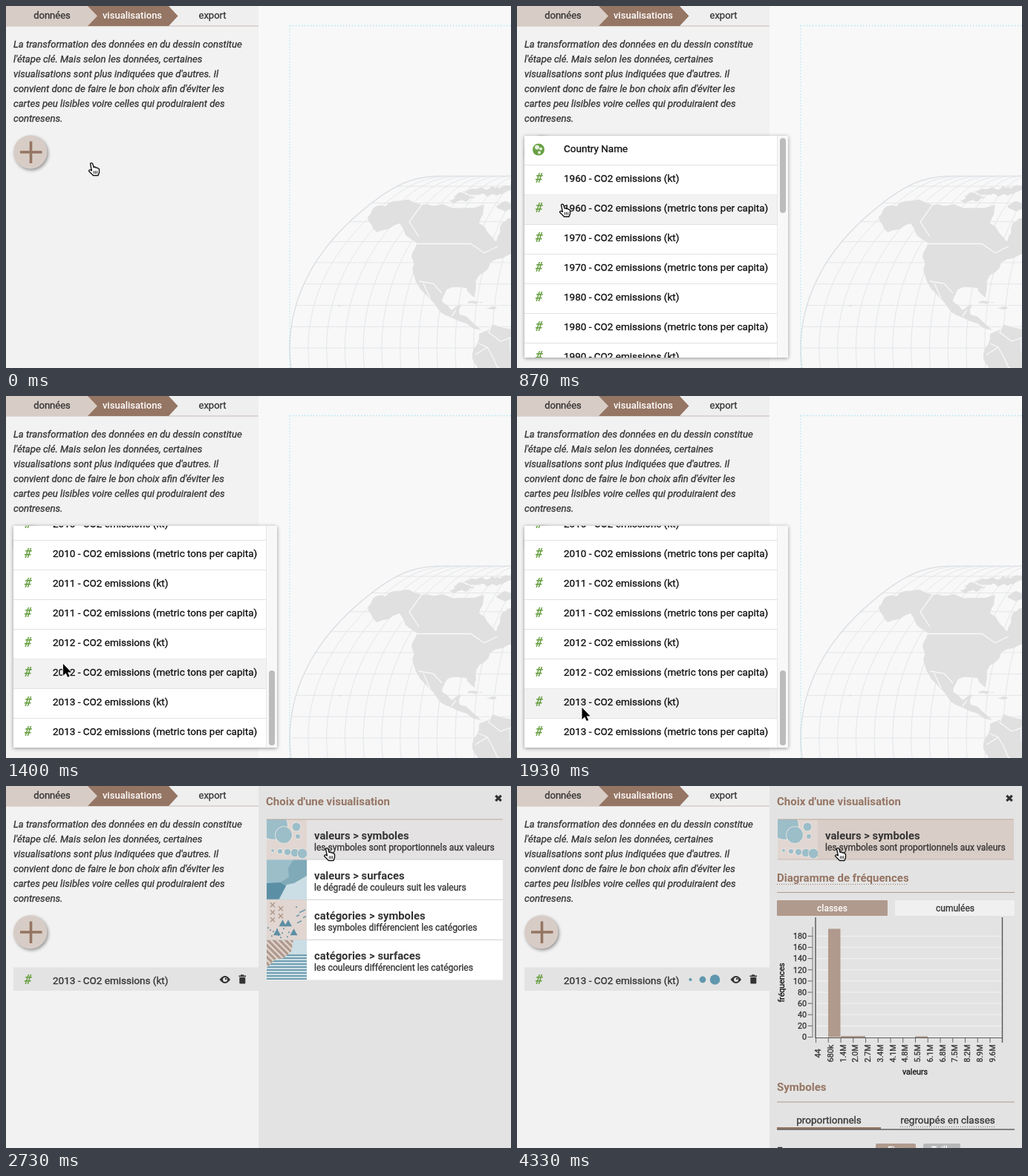
Recreate the animation shown at these times as an HTML page with a canvas. Size 680 by 488 pixels, loop 4.39 s.

```html
<!DOCTYPE html>
<html lang="fr">
<head>
<meta charset="utf-8">
<title>Visualisations</title>
<style>
html, body { margin: 0; width: 100%; height: 100%; overflow: hidden; background: #f8f8f8; }
canvas { display: block; }
</style>
</head>
<body>
<canvas id="stage" width="680" height="488"></canvas>
<script>
const W = 680, H = 488, LOOP = 4390;
const BROWN = '#957563', SAND = '#d8cdc6', TAUPE = '#b09a8d', INK = '#333', GREY = '#e3e3e3';
const GREEN = '#68a043', BLUE = '#9bbec9', STEEL = '#5b8fa5', PALE = '#cbdee5', ROSE = '#e1d6d1';
const T = { open: 400, scroll: 880, scrolled: 1000, pick: 2000, symbol: 3130, detail: 3600 };
let c = document.getElementById('stage').getContext('2d');

function rect(x, y, w, h, color) { c.fillStyle = color; c.fillRect(x, y, w, h); }
function rounded(x, y, w, h, r, color) {
  c.fillStyle = color;
  c.beginPath();
  c.roundRect(x, y, w, h, r);
  c.fill();
}
function disc(x, y, r, color) {
  c.fillStyle = color;
  c.beginPath();
  c.arc(x, y, r, 0, 7);
  c.fill();
}
function fill(d, color) { c.fillStyle = color; c.fill(new Path2D(d)); }
function stroke(d, color, width = 1, dash = []) {
  c.strokeStyle = color;
  c.lineWidth = width;
  c.setLineDash(dash);
  c.stroke(new Path2D(d));
  c.setLineDash([]);
}
function text(s, x, y, size, color = INK, style = '', align = 'left') {
  c.font = `${style} ${size}px Roboto, Arial, sans-serif`;
  c.textAlign = align;
  c.fillStyle = c.strokeStyle = color;
  c.fillText(s, x, y);
  if (/bold|500/.test(style)) return;
  // a hairline gives regular text a fuller weight
  c.lineWidth = 0.3;
  c.strokeText(s, x, y);
}
function upText(s, x, y, size, color) {
  c.save();
  c.translate(x, y);
  c.rotate(-Math.PI / 2);
  text(s, 0, 0, size, color, '', 'center');
  c.restore();
}
function clipped(x, y, w, h, draw) {
  c.save();
  c.beginPath();
  c.rect(x, y, w, h);
  c.clip();
  draw();
  c.restore();
}
function shadowed(color, blur, x, y, draw) {
  c.save();
  c.shadowColor = color;
  c.shadowBlur = blur;
  c.shadowOffsetX = x;
  c.shadowOffsetY = y;
  draw();
  c.restore();
}
function ease(u) {
  u = Math.min(1, Math.max(0, u));
  return u * u * (3 - 2 * u);
}
let seed = 7;
function random() {
  seed = seed * 16807 % 2147483647;
  return seed / 2147483647;
}

// Natural Earth projection
function project(lon, lat) {
  const R = 163, a = lon * Math.PI / 180, p = lat * Math.PI / 180, p2 = p * p, p4 = p2 * p2;
  const k = 0.8707 - 0.131979 * p2 + p4 * (-0.013791 + p4 * (0.003971 * p2 - 0.001529 * p4));
  const y = p * (1.007226 + p2 * (0.015085 + p4 * (-0.044475 + 0.028874 * p2 - 0.005916 * p4)));
  return [828 + R * a * k, 461 - R * y];
}
function meridian(lon, color, width) {
  c.beginPath();
  for (let lat = -20; lat <= 90; lat += 2) c.lineTo(...project(lon, lat));
  c.strokeStyle = color;
  c.lineWidth = width;
  c.stroke();
}

// Splits every edge and nudges its middle, for a ragged coast
function roughen(points) {
  return points.flatMap(([x, y], i) => {
    const [u, v] = points[(i + 1) % points.length], k = (random() - 0.5) * 0.3;
    return [[x, y], [(x + u) / 2 + (v - y) * k, (y + v) / 2 - (u - x) * k]];
  });
}
function land(corners) {
  const points = corners.split(' ').map(p => p.split(',').map(Number));
  fill('M' + roughen(roughen(points)).join('L') + 'Z', '#e0e0e0');
}
function island(x, y, w, h) {
  land(`${x - w},${y} ${x},${y - h} ${x + w},${y} ${x},${y + h}`);
}

function paintMap() {
  rect(340, 0, 340, H, '#f8f8f8');
  for (let lon = -170; lon <= -30; lon += 10) meridian(lon, '#e3e6ea', 1);
  for (let lat = -10; lat <= 90; lat += 10) {
    const [x, y] = project(-180, lat);
    stroke(`M${x} ${y}H${W}`, lat < 90 ? '#e3e6ea' : '#d9dde2');
  }
  meridian(-180, '#d9dde2', 1.3);
  land('498,270 522,263 560,268 588,267 644,268 637,293 660,318 668,292 684,284 684,333 652,346 633,370 631,393 620,380 594,382 587,398 600,410 613,402 611,416 640,437 600,420 575,399 548,359 546,338 553,319 530,293 499,305 487,284');
  land('637,442 655,429 684,437 684,492 642,492 628,468');
  for (let i = 0; i < 11; i++) island(605 + i * 7, 262 - i * 1.3 - random() * 8, 9 + random() * 4, 3 + random() * 3);
  island(672, 270, 12, 7);
  island(632, 400, 11, 2);
  island(654, 407, 7, 2);
  disc(449, 404, 1.3, '#e0e0e0');
  stroke('M561 266L543 291L556 311M552 320.5H626L644 333L662 324M556 371L575 374L587 387M562 374L571 394M600 418L606 410', '#f8f8f8', 1.3);
  stroke('M654 429L650 440L666 452L680 447M637 455L648 460L632 470M648 460L656 474L662 488', '#f8f8f8', 1.3);
  stroke('M382 26.5H680M382 26.5V488', '#a5e3ec', 1.3, [1.3, 2.7]);
}
const map = document.createElement('canvas');
map.width = W;
map.height = H;
const screen = c;
c = map.getContext('2d');
paintMap();
c = screen;

function paintTabs() {
  rect(0, 0, 340, 27, '#efefef');
  rect(0, 26.5, 340, 1, '#c9beb7');
  fill('M0 0H219L231.5 13.5L219 27H0Z', BROWN);
  fill('M0 0H110L123 13.5L110 27H0Z', SAND);
  text('données', 62, 17, 13, INK, '', 'center');
  text('visualisations', 170, 17, 13, '#fff', '500', 'center');
  text('export', 278, 17, 13, INK, '', 'center');
}
const INTRO = [
  'La transformation des données en du dessin constitue',
  "l'étape clé. Mais selon les données, certaines",
  "visualisations sont plus indiquées que d'autres. Il",
  "convient donc de faire le bon choix afin d'éviter les",
  'cartes peu lisibles voire celles qui produiraient des',
  'contresens.'
];
function paintLeft(t) {
  rect(0, 0, 340, H, '#f2f2f2');
  paintTabs();
  INTRO.forEach((s, i) => text(s, 10, 56 + i * 20, 13.13, INK, 'italic'));
  shadowed('rgba(0,0,0,.4)', 4, 1.5, 2, () => disc(32.8, 196.8, 22.6, SAND));
  stroke('M19 197H48.5M33.5 182.5V212', BROWN, 3.6);
  if (t >= T.pick) paintVariable(t);
}
function hash(y) { text('#', 29.5, y, 17.5, GREEN, 'italic bold', 'center'); }
function paintVariable(t) {
  rect(10, 244.5, 330, 31.5, GREY);
  hash(267);
  text('2013 - CO2 emissions (kt)', 63, 267, 13.5);
  if (t >= T.symbol)
    for (let i = 0; i < 3; i++) disc(233.5 + i * 16.5, 261, 2 + i * 2.4, '#5f97ae');
  fill('M287.5 261Q295 251 302 261Q295 271 287.5 261Z', INK);
  disc(295, 261, 3, GREY);
  disc(296, 260, 1.2, INK);
  rect(316, 254.3, 4, 1.5, INK);
  rect(313.5, 255.5, 9.5, 1.7, INK);
  rounded(314.3, 258, 8, 8.5, 1, INK);
}

const LABELS = ['Country Name'];
for (let y = 1960; y < 2014; y += y < 2010 ? 10 : 1)
  LABELS.push(`${y} - CO2 emissions (kt)`, `${y} - CO2 emissions (metric tons per capita)`);

function paintList(t, pos) {
  const k = ease((t - T.scroll) / (T.scrolled - T.scroll));
  const top = 174.5 - k * (LABELS.length * 40 - 300);
  const still = t < T.scroll || t > T.scrolled + 200;
  shadowed('rgba(0,0,0,.4)', 5, 0, 1, () => rect(10, 175, 355, 299, '#fff'));
  clipped(10, 175, 355, 299, () => {
    LABELS.forEach((s, i) => {
      const y = top + i * 40;
      if (still && pos.y >= y && pos.y < y + 40) rect(10, y, 341, 40, '#f2f2f2');
      rect(10, y + 39.5, 341, 1, '#e2e2e2');
      if (i) hash(y + 23.5);
      else paintGlobe(29, y + 19);
      text(s, 63, y + 22.5, 13.5, '#111');
    });
    rect(350, 175, 15, 299, '#f8f8f8');
    rect(350, 175, 1, 299, '#e6e6e6');
    rounded(354, 178 + k * 192, 8, 101, 4, '#bcbcbc');
  });
}
function paintGlobe(x, y) {
  disc(x, y, 8, GREEN);
  disc(x - 2, y - 3, 3, '#e8f1e2');
  disc(x + 3, y - 1, 2, '#e8f1e2');
  disc(x + 1, y + 4, 2, '#e8f1e2');
}

function bubble(x, y, r) {
  disc(x, y, r + 0.8, '#eee8e5');
  disc(x, y, r, BLUE);
}
const thumbs = [
  () => {
    rect(0, 0, 54, 54, ROSE);
    bubble(9, 8, 19);
    bubble(23, 21, 11);
    bubble(40, 10, 5.5);
    bubble(42, 23, 3);
    for (let i = 0; i < 5; i++) bubble(8 + i * 10, 42 + i, 2 + i * 1.1);
  },
  () => {
    rect(0, 0, 54, 54, BLUE);
    fill('M54 0H36L29 12L30 24L18 31L22 40L54 30Z', '#80aab8');
    fill('M0 32L18 31L26 36L16 54H0Z', STEEL);
    fill('M54 22L37 32L27 34L17 54H54Z', PALE);
  },
  () => {
    rect(0, 0, 54, 54, ROSE);
    for (let i = 0; i < 5; i++)
      stroke(`M${5 + i % 2 * 11} ${4 + i * 5}l6 6m0-6l-6 6`, TAUPE, 1.5);
    for (let i = 0; i < 4; i++)
      fill(`M${14 + i * 7.5} ${31 + 8 * Math.cos(i * 2.1)}l5 9h-10z`, STEEL);
    for (let i = 0; i < 12; i++) {
      disc(40 + i * 5 % 13, 10 + i * 7 % 22, 1, STEEL);
      disc(2 + i * 7 % 30, 38 + i * 5 % 14, 1, STEEL);
    }
  },
  () => {
    rect(0, 0, 54, 54, PALE);
    for (let y = 20; y < 54; y += 4) rect(0, y, 54, 1.6, STEEL);
    c.clip(new Path2D('M0 0H36L33 16L22 25L12 26L0 38Z'));
    rect(0, 0, 54, 54, ROSE);
    for (let x = -60; x < 54; x += 8) stroke(`M${x} -5l50 50`, TAUPE, 3.4);
  }
];
const CARDS = [
  ['valeurs > symboles', 'les symboles sont proportionnels aux valeurs'],
  ['valeurs > surfaces', 'le dégradé de couleurs suit les valeurs'],
  ['catégories > symboles', 'les symboles différencient les catégories'],
  ['catégories > surfaces', 'les couleurs différencient les catégories']
];
function paintCard(i, bg) {
  const y = 45 + i * 54.1;
  rect(351, y, 318, 54.1, bg);
  c.save();
  c.translate(351, y);
  clipped(0, 0, 54, 54, thumbs[i]);
  c.restore();
  text(CARDS[i][0], 415, y + 27, 14.8, INK, 'bold');
  text(CARDS[i][1], 415, y + 42, 12.1);
  rect(351, y - 0.5, 318, 1, i ? '#cfcfcf' : '#bda99e');
}
function paintPanel(t, pos) {
  rect(340, 0, 340, H, GREY);
  text("Choix d'une visualisation", 350, 26, 15, BROWN, 'bold');
  stroke('M659.3 12.8l7.4 7.4m0-7.4l-7.4 7.4', INK, 3.2);
  if (t >= T.detail) {
    paintCard(0, '#d9cdc7');
    rect(351, 98.5, 318, 1, '#c9b9b1');
    paintChart();
    paintSymbols();
    return;
  }
  CARDS.forEach((_, i) => {
    const y = 45 + i * 54.1, hover = pos.x > 352 && pos.y >= y && pos.y < y + 54;
    paintCard(i, hover ? '#e4e2e2' : '#fff');
  });
}
function paintChart() {
  text('Diagramme de fréquences', 350, 129, 15, BROWN, 'bold');
  stroke('M350 132.5H527', BROWN, 1, [1, 2]);
  rect(350, 143, 320, 1, TAUPE);
  rounded(350, 154, 149, 21, 1, TAUPE);
  rounded(509, 154, 161, 21, 1, '#f0f0f0');
  text('classes', 424.5, 169, 12, '#fff', '500', 'center');
  text('cumulées', 590, 169, 12, INK, '', 'center');
  for (let v = 0; v <= 180; v += 20) {
    const y = 338.5 - v * 0.756;
    rect(403, y - 0.5, 250, 1, '#f3f3f3');
    stroke(`M391.5 ${y}H398`, '#666');
    text(v, 390, y + 3.8, 10.7, INK, '', 'right');
  }
  stroke('M398 190V339', '#777');
  rect(419, 192.5, 16.5, 146, TAUPE);
  rect(436, 337, 33, 2, TAUPE);
  rect(536, 337.5, 17, 1.5, TAUPE);
  stroke('M402 177V340M653.5 177V346', '#555', 1.4);
  stroke('M402 339.5H654', '#555');
  for (let i = 0; i < 15; i++) {
    const x = 402.5 + i * 16.75;
    const label = i > 1 ? (i * 0.683).toFixed(1) + 'M' : i ? '680k' : '44';
    stroke(`M${x} 340v6`, '#666');
    upText(label, x + 6.5, 360.5, 10.7, INK);
  }
  text('valeurs', 536, 389, 10.7, '#111', '', 'center');
  upText('fréquences', 360, 265, 10.7, '#111');
}
function paintSymbols() {
  text('Symboles', 350, 411, 15, BROWN, 'bold');
  rect(350, 425.5, 320, 1, TAUPE);
  text('proportionnels', 420, 455, 13.5, INK, '', 'center');
  text('regroupés en classes', 580, 455, 13.5, INK, '', 'center');
  stroke('M516 459.5H644', '#777', 1, [1, 2]);
  rect(350, 460, 140, 2.5, BROWN);
  rect(350, 462.5, 320, 1, '#222');
  text('Forme', 350, 496, 13.5);
  rounded(483, 482, 54, 20, 2, TAUPE);
  rounded(547, 482, 50, 20, 2, '#b7b7b7');
  text('Fixe', 510, 495, 12, '#fff', '', 'center');
  text('Taille', 572, 495, 12, '#fff', '', 'center');
}

const MOVES = [
  { from: 70, to: 330, x: 38, y: 199 },
  { from: 450, to: 730, x: 60, y: 267 },
  { from: 1130, to: 1600, x: 87.5, y: 420 },
  { from: 2130, to: 2330, x: 350.5, y: 143 },
  { from: 2330, to: 2600, x: 431, y: 83.5 }
];
function cursorAt(t) {
  let x = 114, y = 211.5;
  for (const m of MOVES) {
    const k = ease((t - m.from) / (m.to - m.from));
    x += (m.x - x) * k;
    y += (m.y - y) * k;
  }
  return { x, y };
}
function paintCursor(t, pos) {
  c.save();
  c.translate(pos.x, pos.y);
  c.lineJoin = 'round';
  if (t > 1250 && t < 2470) {
    const arrow = 'M0 0V16l3.7-3.5l2.6 5.5l2.4-1.1l-2.6-5.3h5z';
    stroke(arrow, '#fff', 1.8);
    fill(arrow, '#000');
  } else {
    const hand = 'M-.5 1.2Q1-.8 2.6 1L4.2 6Q6 5 7 6.5Q9 6 9.6 7.4Q11.5 7.2 11.5 9V13L10 17H3.5L-2.5 11Q-2 8 1.4 10.4Z';
    fill(hand, '#fff');
    stroke(hand, '#111', 1.4);
    for (let x = 4.4; x < 9; x += 2.1) stroke(`M${x} 10.8v3.8`, '#222', 1);
  }
  c.restore();
}

function frame() {
  const t = performance.now() % LOOP, pos = cursorAt(t);
  paintLeft(t);
  if (t < T.pick) c.drawImage(map, 340, 0, 340, H, 340, 0, 340, H);
  else paintPanel(t, pos);
  if (t >= T.open && t < T.pick) paintList(t, pos);
  paintCursor(t, pos);
  requestAnimationFrame(frame);
}
frame();
</script>
</body>
</html>
```
